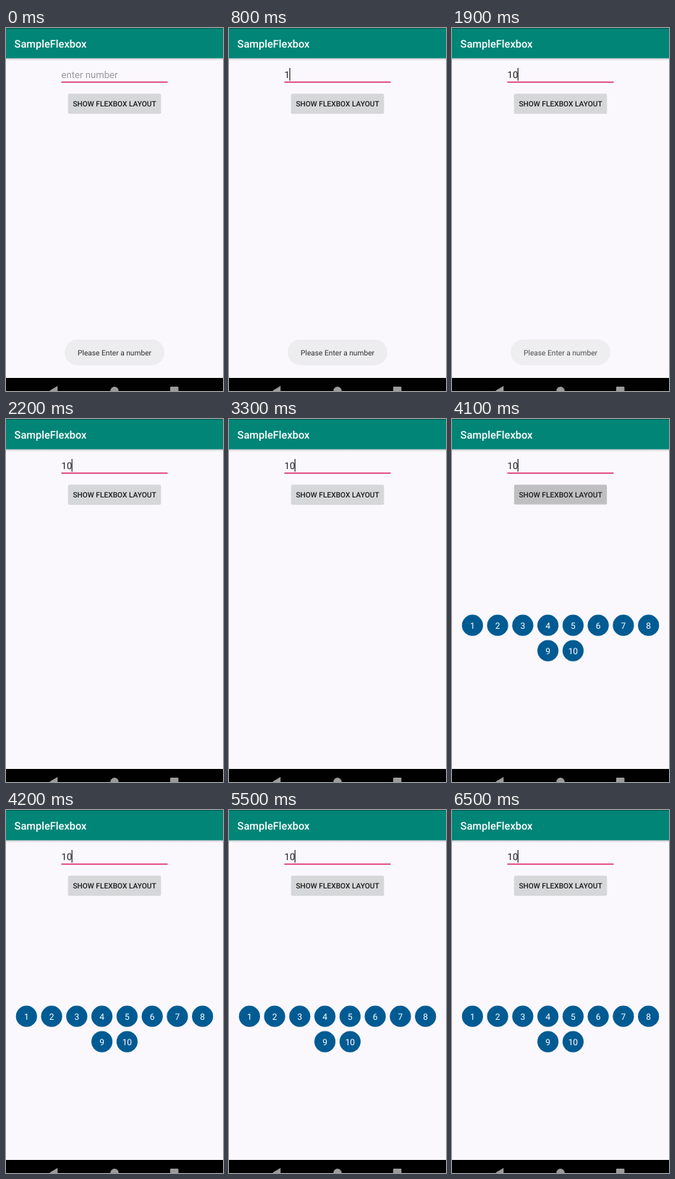
An HTML page that plays this animation: 300 by 500 pixels, repeating every 8 s.

```html
<!DOCTYPE html>
<html lang="en">
<head>
<meta charset="utf-8">
<title>Flexbox sample</title>
<style>
  html, body { margin: 0; width: 100%; height: 100%; overflow: hidden; background: #faf8fd; }
  svg { display: block; width: 300px; height: 500px; }
  text { font-family: Roboto, sans-serif; text-rendering: geometricPrecision; }
  .medium { font-weight: 500; }
  .mid { text-anchor: middle; }
</style>
</head>
<body>
<svg viewBox="0 0 300 500">
  <defs>
    <linearGradient id="shade" x1="0" y1="0" x2="0" y2="1">
      <stop offset="0" stop-color="#000" stop-opacity=".2"/>
      <stop offset="1" stop-color="#000" stop-opacity="0"/>
    </linearGradient>
  </defs>
  <rect width="300" height="500" fill="#faf8fd"/>

  <rect y="41.5" width="300" height="3.5" fill="url(#shade)"/>
  <rect width="300" height="41.7" fill="#008577"/>
  <rect width="300" height="1" fill="#00574b"/>
  <text class="medium" x="11.6" y="27.2" font-size="14.6" fill="#fff">SampleFlexbox</text>

  <text id="field" x="76.5" y="69" font-size="13.14"></text>
  <rect id="cursor" y="55" width="1.3" height="17.5" fill="#333"/>
  <rect x="76.5" y="73.8" width="147" height="1.5" fill="#d81b60"/>

  <rect x="85.6" y="91" width="128.8" height="27.3" rx="2" fill="#000" opacity=".1"/>
  <rect x="86" y="91" width="128" height="26.4" rx="1.5" fill="#000" opacity=".1"/>
  <rect id="button" x="86" y="90.5" width="128" height="26.4" rx="1.5"/>
  <text class="medium mid" x="150" y="107.7" font-size="10.2" fill="#1c1c1c">SHOW FLEXBOX LAYOUT</text>

  <g id="chips"></g>

  <g id="toast">
    <rect x="81" y="429" width="138" height="35.5" rx="17.7" fill="#ededef"/>
    <text class="mid" x="150" y="450.6" font-size="10.2" fill="#303030">Please Enter a number</text>
  </g>

  <rect y="482" width="300" height="18" fill="#000"/>
  <g fill="#9b9b9b">
    <path d="M71.3 493 60.3 499.5 71.3 506Z"/>
    <circle cx="150" cy="499.7" r="5.7"/>
    <rect x="227" y="494" width="11.4" height="11.4" rx="1"/>
  </g>
</svg>
<script>
  const LOOP = 8000;
  const $ = id => document.getElementById(id);

  // Each track is a list of [start in ms, value]; values hold until the next step.
  const tracks = {
    typed: [[0, ''], [800, '1'], [1500, '10']],
    blink: [[0, 0], [400, 1], [1700, 0], [1900, 1], [2900, 0], [3300, 1], [3800, 0],
            [4100, 1], [5000, 0], [5500, 1], [6000, 0], [6500, 1]],
    toast: [[0, 1], [1900, .85], [2000, .5], [2100, .2], [2200, 0]],
    button: [[0, '#d6d7d9'], [3900, '#b9babc'], [4100, '#bfbfc1'], [4200, '#d6d7d9']],
    chips: [[0, 0], [4100, 1]]
  };
  const cursorX = [76.4, 83.4, 90.6];

  function add(tag, attrs, label = '') {
    const el = document.createElementNS('http://www.w3.org/2000/svg', tag);
    for (const key in attrs) el.setAttribute(key, attrs[key]);
    el.textContent = label;
    $('chips').append(el);
  }

  function chipRow(first, count, y) {
    for (let i = 0; i < count; i++) {
      const x = 150 + (i - (count - 1) / 2) * 34.77;
      add('circle', { cx: x, cy: y, r: 14.6, fill: '#005b93' });
      add('text', { class: 'mid', x, y: y + 4.4, 'font-size': 12, fill: '#fff' }, first + i);
    }
  }
  chipRow(1, 8, 284.2);
  chipRow(9, 2, 319.1);

  function at(track, t) {
    let value;
    for (const [start, v] of track) if (start <= t) value = v;
    return value;
  }

  function draw(t) {
    const typed = at(tracks.typed, t);
    $('field').textContent = typed || 'enter number';
    $('field').setAttribute('fill', typed ? '#222' : '#9a999c');
    $('cursor').setAttribute('x', cursorX[typed.length]);
    $('cursor').setAttribute('opacity', at(tracks.blink, t));
    $('toast').setAttribute('opacity', at(tracks.toast, t));
    $('button').setAttribute('fill', at(tracks.button, t));
    $('chips').setAttribute('opacity', at(tracks.chips, t));
  }

  const begin = performance.now();
  function tick() {
    draw((performance.now() - begin) % LOOP);
    requestAnimationFrame(tick);
  }
  tick();
</script>
</body>
</html>
```
